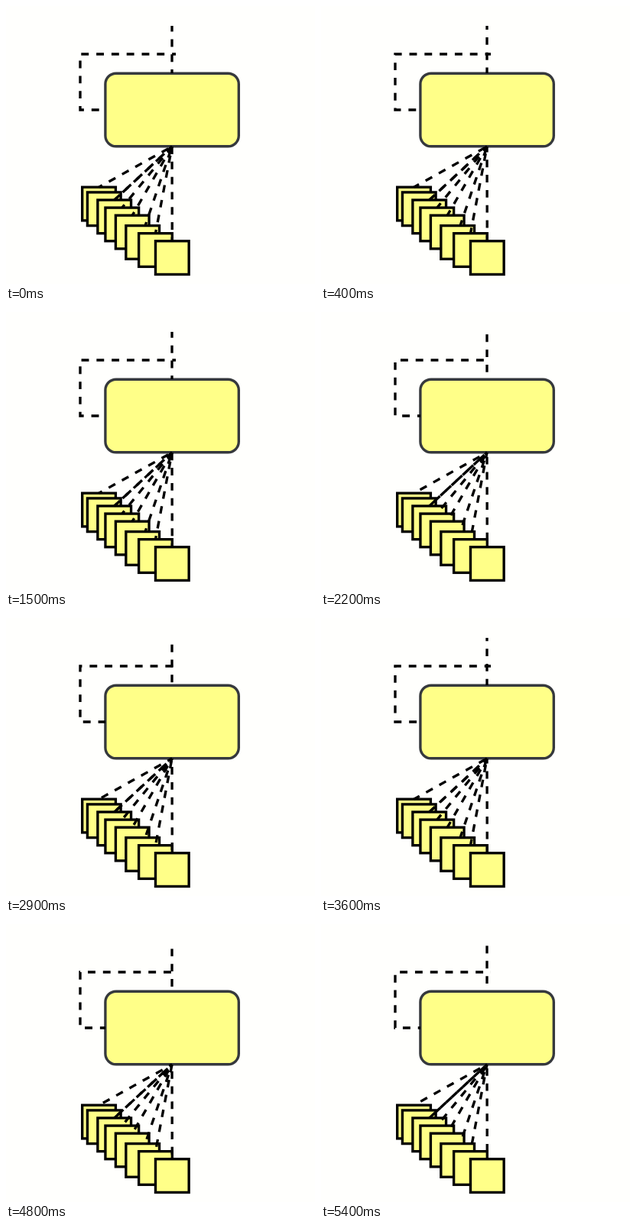
Animation, 404 px wide and 364 px high, one loop 5.5 s. Source, as an HTML page:

```html
<!DOCTYPE html>
<html lang="en">
<head>
<meta charset="utf-8">
<title>Flow diagram</title>
<style>
  html, body { margin: 0; width: 100%; height: 100%; overflow: hidden; background: #fffffd; }
  svg { display: block; }
  rect { fill: #ffff88; stroke: #000; stroke-width: 3.36; }
  .box { stroke: #36393d; }
  path { fill: none; stroke: #000; stroke-width: 3.36; stroke-dasharray: 9.9; }
</style>
</head>
<body>
<svg width="404" height="364" viewBox="0 0 404 364">
  <rect class="box" x="129.9" y="88.2" width="174.4" height="95.6" rx="14"/>
  <g id="squares"></g>
  <path d="M141.7 254L217 184"/>
  <g id="flows">
    <path d="M217 88V26"/>
    <path d="M222 63H97V136H130"/>
  </g>
</svg>
<script>
  const PERIOD = 19.8, STEP_MS = 100, STEPS = 55;
  const ADVANCE = 0.5325; // dash periods travelled per step
  const UNIT = 3.36, SIZE = 13 * UNIT;
  // column, row and connector shift in grid units
  const cells = [[0, 0], [2, 2], [6, 5], [9, 8], [13, 11], [17, 15, 1], [22, 18], [28.5, 21]];
  const squares = document.getElementById('squares');
  const flows = document.getElementById('flows');

  function add(parent, tag, attrs) {
    const node = document.createElementNS('http://www.w3.org/2000/svg', tag);
    for (const key in attrs) node.setAttribute(key, attrs[key]);
    parent.append(node);
  }

  cells.forEach(([column, row, shift = 0], i) => {
    const x = 99.7 + column * UNIT, y = 237.2 + row * UNIT;
    add(squares, 'rect', { x, y, width: SIZE, height: SIZE });
    // the second square has no connector of its own
    if (i !== 1) add(flows, 'path', { d: `M${x + SIZE / 2 + shift * UNIT} ${y}L217 184` });
  });

  function draw() {
    const step = Math.floor(performance.now() / STEP_MS) % STEPS;
    flows.style.strokeDashoffset = 5 - (step * ADVANCE % 1) * PERIOD;
    requestAnimationFrame(draw);
  }
  draw();
</script>
</body>
</html>
```
